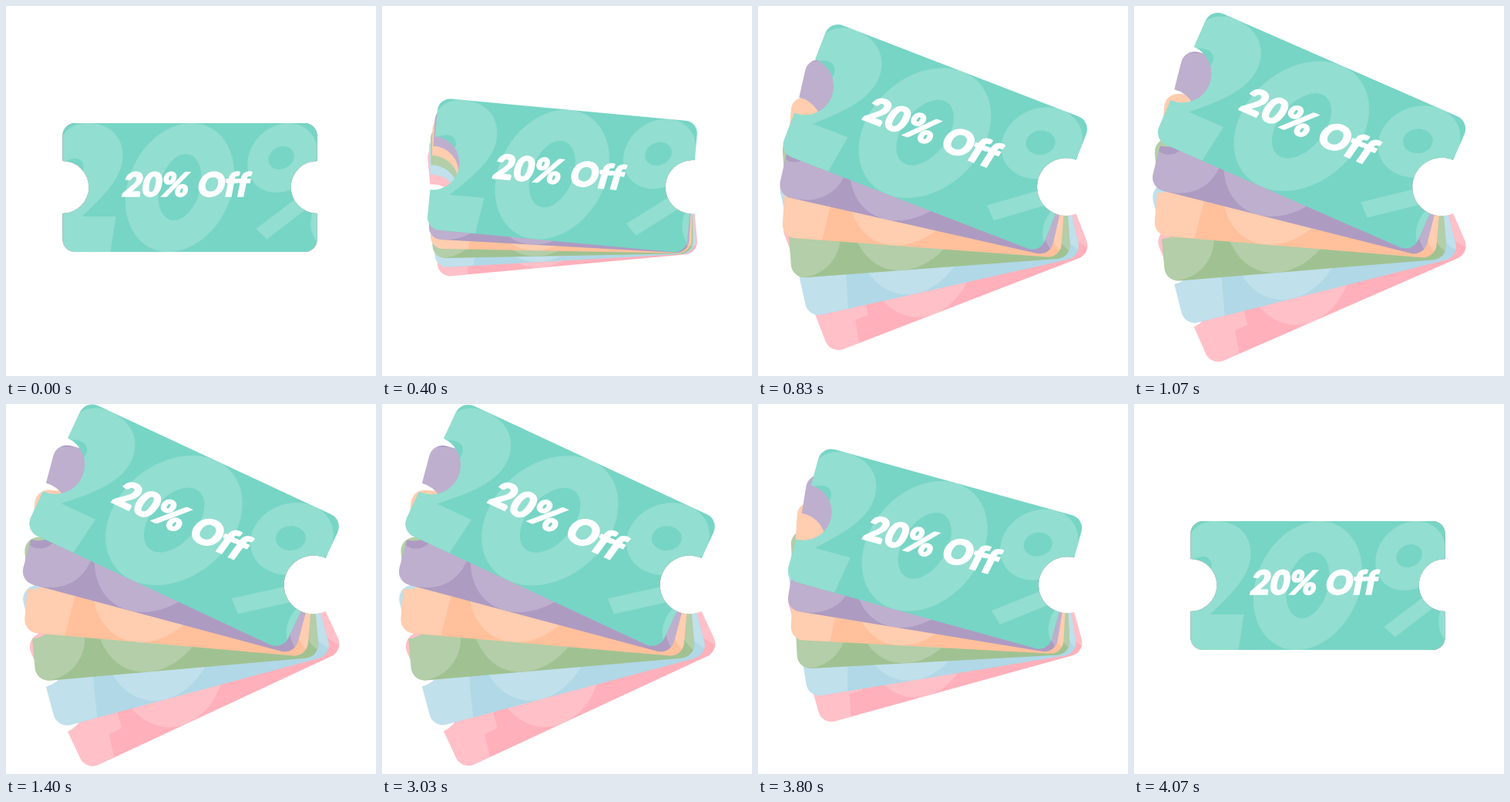
Write an HTML page that moves like this. It is 480 by 480 pixels and loops after 5.01 s.

```html
<!DOCTYPE html>
<html lang="en">
<head>
<meta charset="utf-8">
<title>Discount tickets</title>
<style>
  html, body { margin: 0; width: 100%; height: 100%; overflow: hidden; background: #fff; }
  svg { display: block; width: 100%; height: 100%; }
  .label {
    font: 900 43px Lato, sans-serif; font-variant-ligatures: none;
    fill: #fff; stroke: #fff; stroke-width: 1.6;
  }
  .print { fill: #fff; fill-opacity: .2; fill-rule: evenodd; }
</style>
</head>
<body>
<svg viewBox="0 0 480 480">
  <defs>
    <path id="shape" d="M90 152H388a16 16 0 0 1 16 16V201a34 34 0 0 0 0 68V303a16 16 0 0 1 -16 16H90a16 16 0 0 1 -16 -16V269a34 34 0 0 0 0 -68V168a16 16 0 0 1 16 -16Z"/>
    <clipPath id="cut"><use href="#shape"/></clipPath>
  </defs>
  <g id="fan"></g>
</svg>
<script>
const LOOP = 5010, STEPS = 32, DECAY = 3.7;

// Closed ellipse leaning to the right like an oblique numeral
function oval(cx, cy, rx, ry, lean = 0.18) {
  const points = Array.from({ length: 72 }, (_, i) => {
    const a = i * Math.PI / 36, y = ry * Math.sin(a);
    return (cx + rx * Math.cos(a) - lean * y).toFixed(1) + ' ' + (cy + y).toFixed(1);
  });
  return 'M' + points.join('L') + 'Z';
}

const zero = oval(226, 235.5, 69, 83.5) + oval(226, 235, 27, 43);
const percent = oval(359, 197, 44.5, 45) + oval(357.5, 197, 16.5, 15) +
  oval(441, 274, 44.5, 45) + 'M325 289L426 212L440 225L339 302.5Z';
const digits = {
  one: 'M60 152H150L122 319H60Z',
  two: 'M70 176C76 160 90 152 106 152C136 152 152 170 152 194C152 222 128 246 99 273' +
    'H143L136 319H40V290L70 244C90 230 101 220 101 209C101 201 95 197 88 198C80 199 75 203 70 208Z',
  three: 'M60 168C75 155 92 152 104 152C134 152 150 168 150 190C150 208 142 220 132 227' +
    'C143 235 148 248 148 265C148 300 124 319 92 319H60Z' + oval(84, 262, 17, 15),
  five: 'M60 152H142L134 196H110V226C126 234 135 248 135 267C135 299 112 319 84 319H60Z',
  four: 'M60 152H142L125 250H140L132 292H116L110 319H60Z'
};

// Bottom of the stack first: colour, first digit, final angle, offset of the rest of the number
const tickets = [
  ['#ffb0ba', 'four', -25, -6],
  ['#b0d8e7', 'one', -15, -6],
  ['#a0c292', 'five', -5, -6],
  ['#ffc09b', 'one', 5, -6],
  ['#ae9bc2', 'three', 15, -6],
  ['#77d5c5', 'two', 25, 0]
];

const fan = document.getElementById('fan');
fan.innerHTML = tickets.map(([color, digit, , offset]) => `<g>
  <use href="#shape" fill="${color}"/>
  <g class="print" clip-path="url(#cut)">
    <path d="${digits[digit]}"/>
    <g transform="translate(${offset})"><path d="${zero}"/><path d="${percent}"/></g>
  </g></g>`).join('');

const word = (text, x) =>
  `<text class="label" transform="translate(${x} 247) skewX(-11)">${text}</text>`;
fan.lastElementChild.insertAdjacentHTML('beforeend', word('20%', 150) + word('Off', 247));

// Opens with an exponential ease-out, holds, then runs the same steps backwards
function openness(time) {
  const tick = Math.floor(time * 0.03 + 0.15);
  const step = Math.max(0, Math.min(STEPS, tick - 10, 122 - tick));
  return (1 - Math.exp(-DECAY * step / STEPS)) / (1 - Math.exp(-DECAY));
}

function draw(now) {
  const p = openness(now % LOOP);
  tickets.forEach(([, , angle], i) => {
    fan.children[i].setAttribute('transform',
      `translate(${403.5 - 5 * p} ${235 - 0.4 * p}) rotate(${angle * p}) scale(${1 + 0.118 * p}) translate(-404 -235)`);
  });
}

let start;
function frame(now) {
  start ??= now;
  draw(now - start);
  requestAnimationFrame(frame);
}
draw(0);
requestAnimationFrame(frame);
</script>
</body>
</html>
```
